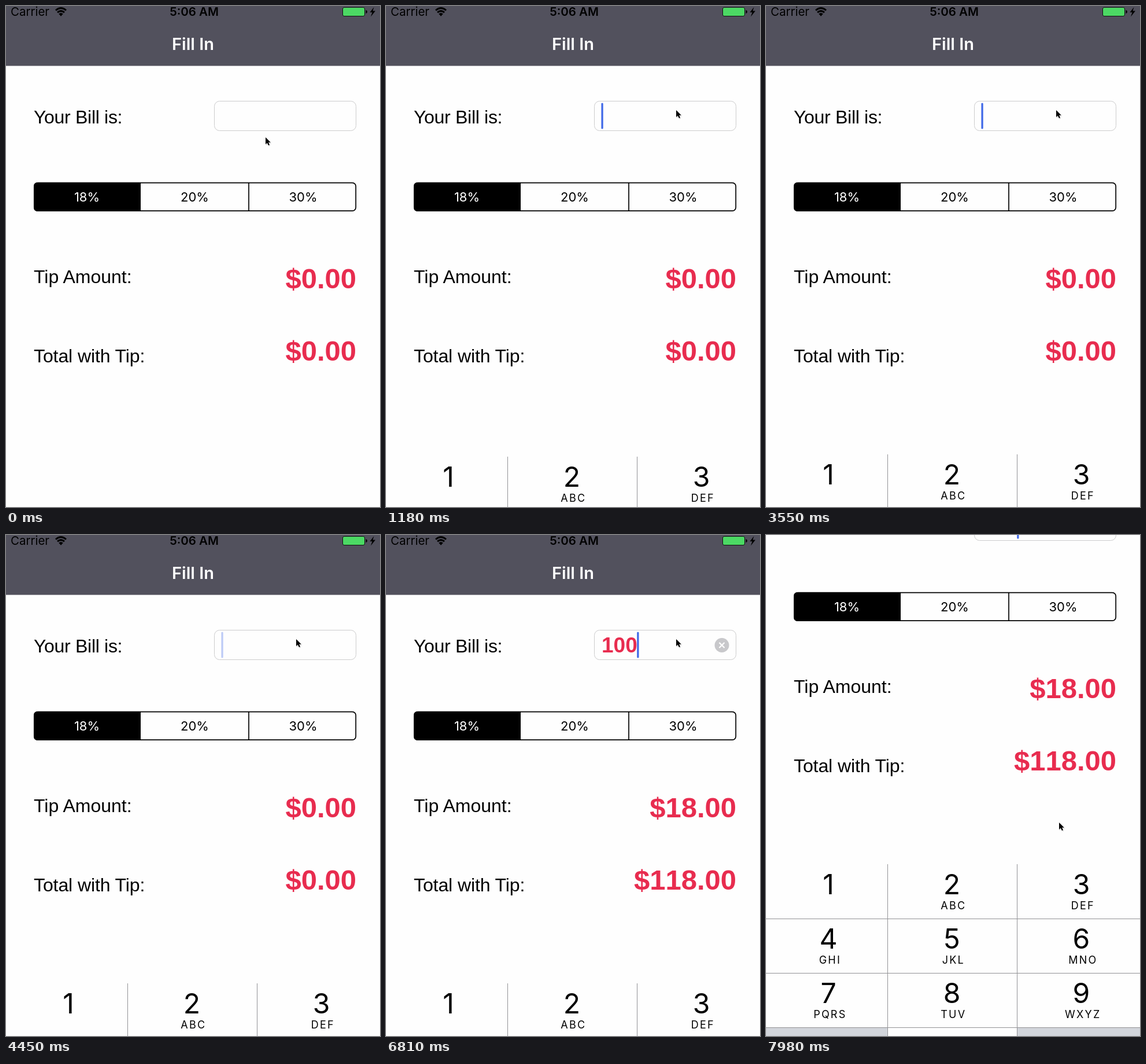
Animation, 647 px wide and 866 px high, one loop 8 s. Source, as an HTML page:

```html
<!DOCTYPE html>
<html lang="en">
<head>
<meta charset="utf-8">
<title>Bill calculator</title>
<style>
  html, body { margin: 0; width: 100%; height: 100%; overflow: hidden; background: #fefefe; }
  svg { display: block; width: 647px; height: 866px; }
  .ui { font-family: Inter, Roboto, sans-serif; }
  .label { font: 32px "Liberation Sans", sans-serif; }
  .amount { font: bold 49px "Liberation Sans", sans-serif; fill: #e82c4f; font-kerning: none; text-anchor: end; }
  .bill { font: bold 37px "Liberation Sans", sans-serif; fill: #e82c4f; font-kerning: none; }
  .status { font-size: 20.5px; }
  .mid { text-anchor: middle; }
  .seg { font-size: 22px; }
  .digit { font-size: 48px; }
  .letters { font-size: 18px; letter-spacing: 2.2px; }
</style>
</head>
<body>
<svg viewBox="0 0 647 866">
  <rect width="647" height="866" fill="#fefefe"/>
  <g id="page">
    <rect width="647" height="103.5" fill="#52515d"/>
    <g class="ui">
      <text class="status" x="8" y="17">Carrier</text>
      <text class="status mid" x="325.5" y="17" font-weight="600">5:06 AM</text>
      <text class="mid" x="323.5" y="76" font-size="29" font-weight="600" fill="#fff">Fill In</text>
    </g>
    <g fill="none" stroke="#000" stroke-width="3">
      <path d="M86 7.5Q95 -0.5 104 7.5"/>
      <path d="M89 11.2Q95 6 101 11.2"/>
    </g>
    <path d="M91.2 13.5Q95 10.5 98.8 13.5L95 17.8Z"/>
    <rect x="582.5" y="2.5" width="38" height="15" rx="2.5" fill="#4cd964" stroke="#111"/>
    <path d="M622.5 7Q625 7.5 625 10T622.5 13Z"/>
    <path d="M636.5 2L629.5 11H633.5L631 18.5L639 8.5H634.5Z"/>

    <text class="label" x="48" y="203" letter-spacing="-.3">Your Bill is:</text>
    <text class="label" x="48" y="479">Tip Amount:</text>
    <text class="label" x="48" y="616" letter-spacing="-.1">Total with Tip:</text>

    <rect x="360.5" y="164.5" width="245" height="51" rx="9" fill="#fefefe" stroke="#cccccd"/>
    <text class="bill" id="bill" x="373" y="203"></text>
    <g id="clear">
      <circle cx="581" cy="190.5" r="12.5" fill="#c8c8cb"/>
      <path d="M576.5 186L585.5 195M585.5 186L576.5 195" stroke="#fff" stroke-width="2.2"/>
    </g>
    <rect id="caret" x="372.4" y="167.5" width="3.3" height="45" rx="1.5" fill="#416ae8"/>

    <rect x="48.8" y="305.7" width="556.4" height="48.4" rx="6" fill="#fefefe" stroke="#000" stroke-width="1.7"/>
    <path d="M233 304.9H55Q48 304.9 48 312V348Q48 354.9 55 354.9H233Z"/>
    <path d="M420 306V354" stroke="#000" stroke-width="1.7"/>
    <g class="ui seg mid">
      <text x="140" y="338" fill="#fff">18%</text>
      <text x="326.5" y="338">20%</text>
      <text x="514" y="338">30%</text>
    </g>

    <text class="amount" id="tip" x="606" y="488"></text>
    <text class="amount" id="total" x="606" y="613"></text>
    <g id="keypad" class="ui mid"></g>
  </g>
  <g id="mouse">
    <path d="M1 2V14L4 11L6 15.5L8 14.5L6.2 10.5H10Z" fill="#000" opacity=".18"/>
    <path d="M0 0V12L2.8 9.4L4.9 14L7 13L5 8.7H8.8Z" stroke="#fff" stroke-width=".9" paint-order="stroke"/>
  </g>
</svg>
<script>
const LOOP = 8000;
const STEP = 147.7;      // the screen refreshes in steps of this length
const FOCUS = 1030;      // the field is clicked
const KEYPAD_UP = 888;
const KEYPAD_HEIGHT = 376;
const SCROLL = 207;
const BLINK = 990;       // caret period
const LIT = 435;         // lit part of the period
const KEY_TIMES = [6370, 6660, 6810];

// Key points of the pointer: time, x, y.
const mousePath = [
  [0, 449, 227], [150, 446, 237], [590, 456, 188], [740, 456, 188],
  [1030, 502, 180], [7250, 502, 180], [7840, 507, 497]
];

const $ = id => document.getElementById(id);
const clamp = v => Math.min(1, Math.max(0, v));
const smooth = p => p * p * (3 - 2 * p);
const money = n => "$" + n.toFixed(2);
const move = (el, x, y) => el.setAttribute("transform", `translate(${x} ${y})`);

function mouseAt(t) {
  const next = mousePath.findIndex(point => point[0] > t);
  if (next < 0) return mousePath.at(-1).slice(1);
  const [t0, x0, y0] = mousePath[next - 1];
  const [t1, x1, y1] = mousePath[next];
  const p = smooth((t - t0) / (t1 - t0));
  return [x0 + (x1 - x0) * p, y0 + (y1 - y0) * p];
}

// Solid at first, then fading in and out around the middle of each lit span.
function blink(age) {
  if (age < 200) return 1;
  const middle = LIT / 2;
  const phase = (age - middle + BLINK / 2) % BLINK - BLINK / 2;
  return clamp(.5 + (middle - Math.abs(phase)) / 120);
}

function caretOpacity(t) {
  if (t < FOCUS) return 0;
  return blink(t - (t < KEY_TIMES[0] ? FOCUS + 450 : KEY_TIMES[2]));
}

const keypadDrop = t =>
  Math.round(KEYPAD_HEIGHT * Math.min(1, Math.exp((KEYPAD_UP - t) / 65)));

const pageScroll = t => -Math.round(SCROLL * clamp((t - 7680) / 296) ** 6.7);

function buildKeypad() {
  const keys = ["", "ABC", "DEF", "GHI", "JKL", "MNO", "PQRS", "TUV", "WXYZ"];
  const columns = [108, 321.5, 545.5];
  const rowHeight = 93.75;
  let svg = `<rect y="775" width="647" height="376" fill="#fefefe"/>
    <path d="M0 1057H210V1151H0ZM435 1057H647V1151H435Z" fill="#d2d5db"/>
    <path d="M210.5 775V1151M434.5 775V1151M0 869.5H647M0 963.5H647M0 1057.5H647" stroke="#929295"/>`;
  keys.forEach((letters, i) => {
    const x = columns[i % 3];
    const y = 827 + Math.floor(i / 3) * rowHeight;
    svg += `<text class="digit" x="${x}" y="${y}">${i + 1}</text>
      <text class="letters" x="${x + 2.8}" y="${y + 26}">${letters}</text>`;
  });
  $("keypad").innerHTML = svg;
}

function draw(time) {
  const t = Math.floor((time + 10) / STEP) * STEP;
  const bill = "100".slice(0, KEY_TIMES.filter(key => key <= time).length);
  $("bill").textContent = bill;
  $("clear").style.display = bill ? "" : "none";
  $("tip").textContent = money(bill * .18);
  $("total").textContent = money(bill * 1.18);
  move($("caret"), bill.length * 20.6, 0);
  $("caret").setAttribute("opacity", caretOpacity(t));
  move($("keypad"), 0, keypadDrop(t));
  move($("page"), 0, pageScroll(t));
  move($("mouse"), ...mouseAt(t));
}

buildKeypad();
const start = performance.now();
function tick() {
  draw((performance.now() - start) % LOOP);
  requestAnimationFrame(tick);
}
tick();
</script>
</body>
</html>
```
